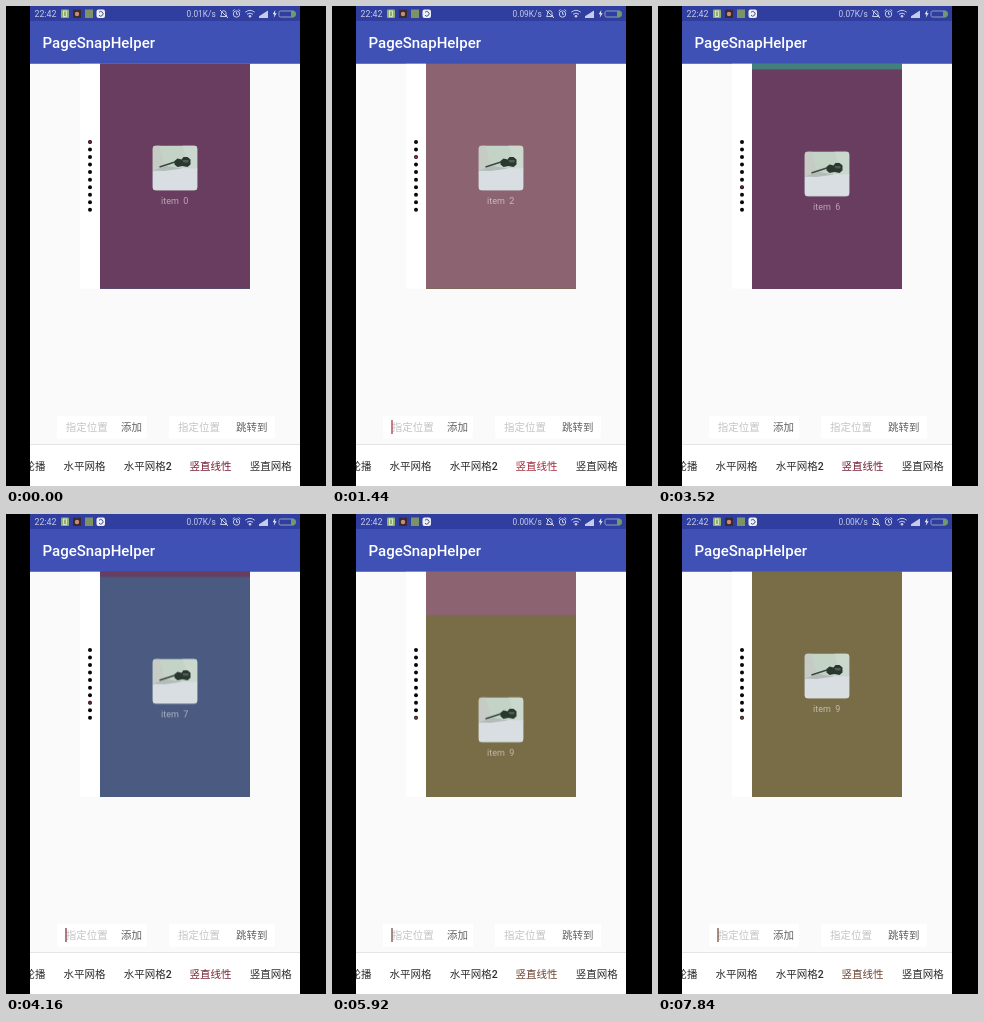
An HTML page that plays this animation: 320x480 px, repeating every 8000 ms.

```html
<!DOCTYPE html>
<html lang="zh">
<head>
<meta charset="utf-8">
<title>PageSnapHelper</title>
<style>
  html, body { margin: 0; width: 100%; height: 100%; overflow: hidden; background: #000; }
  svg { display: block; width: 100%; height: 100%; font-family: Roboto, "Noto Sans CJK SC", "Noto Sans CJK", sans-serif; }
  text { white-space: pre; }
  .status { font-size: 8.8px; fill: #c6cbe8; }
  .rate { font-size: 8.3px; }
  .title { font-size: 15px; font-weight: 500; fill: #fff; }
  .item { font-size: 9px; fill: #fff; fill-opacity: .54; }
  .hint, .button, .tab { font-size: 10.5px; }
  .hint { fill: #c4c4c4; }
  .button { fill: #626262; }
  .tab { fill: #2c2c2c; font-weight: 500; }
  .tab.active { fill: currentColor; }
  .line { fill: none; stroke: #c6cbe8; stroke-width: 1; }
</style>
</head>
<body>
<svg id="stage" viewBox="0 0 320 480">
  <defs>
    <clipPath id="pager"><rect x="94" y="57" width="150" height="225.5"/></clipPath>
    <clipPath id="rounded"><rect width="45" height="45" rx="4"/></clipPath>
    <g id="photo" clip-path="url(#rounded)">
      <rect width="45" height="45" fill="#c3d3c6"/>
      <path d="M0 0H7L12 20 0 26Z" fill="#c6cbc5"/>
      <path d="M30 0H45V24H38Z" fill="#cbd8cd"/>
      <path d="M0 26 14 22 45 23V45H0Z" fill="#d8dee1"/>
      <path d="M0 25 14 20.5 30 23 12 25.5Z" fill="#b3bcb8"/>
      <path d="M7 21.5 24 16" stroke="#3c4842" stroke-width="1.6"/>
      <path d="M22 15.5 25 13 29 14 31 11.5H35L38 14V19L35 21.5 30 20.5 25 21.5 22 19Z" fill="#2a3630"/>
      <path d="M30 14.5H36V17H31Z" fill="#4c5f50"/>
    </g>
  </defs>

  <rect x="24" width="270" height="480" fill="#fafafa"/>
  <rect x="24" y="15" width="270" height="42.6" fill="#3f51b5"/>
  <rect x="24" width="270" height="15" fill="#303f9f"/>
  <text class="title" x="36.5" y="42.3">PageSnapHelper</text>

  <g id="statusBar">
    <text class="status" x="28.5" y="11.2">22:42</text>
    <rect x="55" y="3.5" width="8" height="8.5" rx="1" fill="#8fb071"/>
    <rect x="57.5" y="5" width="3" height="5.5" fill="none" stroke="#e5eddc" stroke-width=".8"/>
    <rect x="67" y="3.7" width="8" height="8.3" fill="#3a2a33"/>
    <circle cx="71" cy="8" r="2.2" fill="#c98c75"/>
    <rect x="79" y="3.5" width="8" height="8.5" fill="#7c9267"/>
    <rect x="90.5" y="3.5" width="8.5" height="8.5" rx="2" fill="#eef0f7"/>
    <path d="M93 6.3A2.3 2.3 0 1 1 93 9.3" fill="none" stroke="#46507f" stroke-width="1"/>
    <path class="line" d="M214.5 10.5H221L220 8.5V6.5A2.3 2.3 0 0 0 215.5 6.5V8.5ZM214 4 222 12"/>
    <circle class="line" cx="230.5" cy="8" r="3.2"/>
    <path class="line" d="M230.5 6V8.3H232M226.7 5 228.5 3.5M234.3 5 232.5 3.5"/>
    <path class="line" d="M239.3 6.2Q244 2.5 248.7 6.2M241 8.3Q244 6 247 8.3"/>
    <circle cx="244" cy="10.3" r="1.3" fill="#c6cbe8"/>
    <path d="M253 12V10.3L262 4.5V12Z" fill="#c6cbe8"/>
    <path d="M269.3 4 266.7 8.3H268.5L267.7 11.8 270.7 7.2H269Z" fill="#e8eaf5"/>
    <rect x="273" y="5" width="15.5" height="6" rx="1.5" fill="none" stroke="#8e9fbb" stroke-width="1"/>
    <path d="M285 5H287.5Q290 5 290 8T287.5 11H285Z" fill="#6f9a6c"/>
  </g>

  <rect x="74" y="57.6" width="20" height="225" fill="#fff"/>
  <g id="dots"></g>
  <circle id="activeDot" cx="84" cy="136" r="1.4" fill="currentColor"/>
  <g clip-path="url(#pager)"><g id="strip"></g></g>
  <rect x="24" y="57" width="270" height="1" fill="#3f51b5" opacity=".45"/>

  <rect x="51" y="410" width="90" height="22.5" fill="#fff"/>
  <rect x="163" y="410" width="106" height="22.5" fill="#fff"/>
  <text class="hint" x="59.7" y="425.4">指定位置</text>
  <text class="button" x="115" y="425.4">添加</text>
  <text class="hint" x="172" y="425.4">指定位置</text>
  <text class="button" x="230" y="425.4">跳转到</text>
  <rect id="caret" x="59.2" y="414" width="1.6" height="14" fill="currentColor" fill-opacity=".75"/>

  <rect x="24" y="438" width="270" height="42" fill="#fff"/>
  <rect x="24" y="438" width="270" height="1" fill="#e4e4e4"/>
  <g id="tabs"></g>
  <rect width="24" height="480"/>
  <rect x="294" width="26" height="480"/>
</svg>
<script>
const LOOP = 8000, TOP = 57.5, PAGE = 225, DOT_GAP = 7.53, SNAP = 500;
const COLORS = ['#693d5f', '#4a5a80', '#8c6370', '#796d47', '#4f7d3f', '#42807d'];
const ACCENTS = ['#741c34', '#742434', '#a02838', '#6a4232', '#544430', '#5c3038'];
const SNAP_STARTS = [330, 890, 1490, 2040, 2600, 3125, 3760, 4330, 5667];
const RATES = [[0, '0.01K/s'], [1000, '0.09K/s'], [3100, '0.07K/s'], [5200, '0.00K/s']];
const BLINK = 955, BLINK_ON = 187, BLINK_OFF = 653;

const byId = id => document.getElementById(id);
const cycle = (list, i) => list[i % list.length];

function add(parent, tag, attrs, text = '') {
  const el = document.createElementNS('http://www.w3.org/2000/svg', tag);
  for (const key in attrs) el.setAttribute(key, attrs[key]);
  el.textContent = text;
  return parent.appendChild(el);
}

const animations = [];
function play(el, frames) {
  animations.push(el.animate(frames, { duration: LOOP, iterations: Infinity }));
}

// Each [time, value] holds until the next entry.
function hold(el, prop, steps) {
  const frames = steps.map(([time, value]) => ({ offset: time / LOOP, [prop]: value, easing: 'steps(1, end)' }));
  play(el, [...frames, { offset: 1, [prop]: steps[steps.length - 1][1] }]);
}

for (let i = 0; i < 10; i++) {
  add(byId('dots'), 'circle', { cx: 84, cy: 136 + i * DOT_GAP, r: 2, fill: '#080808' });
  const page = add(byId('strip'), 'g', { transform: `translate(94 ${TOP + i * PAGE})` });
  add(page, 'rect', { width: 150, height: PAGE + .5, fill: cycle(COLORS, i) });
  add(page, 'use', { href: '#photo', x: 52.5, y: 82 });
  add(page, 'text', { class: 'item', x: 61, y: 140.7 }, `item  ${i}`);
}

const tabs = [[18.5, '轮播'], [57.5, '水平网格'], [117.7, '水平网格2'], [183.5, '竖直线性'], [243.7, '竖直网格']];
tabs.forEach(([x, label], i) =>
  add(byId('tabs'), 'text', { class: i === 3 ? 'tab active' : 'tab', x, y: 463.7 }, label));

const shift = y => `translateY(${y}px)`;
const scroll = [{ offset: 0, transform: shift(0) }];
SNAP_STARTS.forEach((start, i) => scroll.push(
  { offset: start / LOOP, transform: shift(-i * PAGE), easing: 'cubic-bezier(.3, 0, .2, 1)' },
  { offset: (start + SNAP) / LOOP, transform: shift(-(i + 1) * PAGE) }));
scroll.push({ offset: 1, transform: shift(-9 * PAGE) });
play(byId('strip'), scroll);

const selected = [0, ...SNAP_STARTS.map(start => start + SNAP / 2 - 10)];
hold(byId('stage'), 'color', selected.map((time, i) => [time, cycle(ACCENTS, i)]));
hold(byId('activeDot'), 'transform', selected.map((time, i) => [time, shift(i * DOT_GAP)]));

RATES.forEach(([from, label], i) => {
  const el = add(byId('statusBar'), 'text', { class: 'status rate', x: 180.6, y: 11.2 }, label);
  const to = i + 1 < RATES.length ? RATES[i + 1][0] : LOOP;
  const steps = [[0, 0], [from, 1], [to, 0]].filter(([time], k) => time < LOOP && (k || from));
  hold(el, 'opacity', steps);
});

const blinks = [[0, 0]];
for (let t = 0; t < LOOP; t += BLINK) blinks.push([t + BLINK_ON, 1], [t + BLINK_OFF, 0]);
hold(byId('caret'), 'opacity', blinks.filter(([time]) => time < LOOP));

animations.forEach(animation => { animation.startTime = document.timeline.currentTime; });
</script>
</body>
</html>
```
